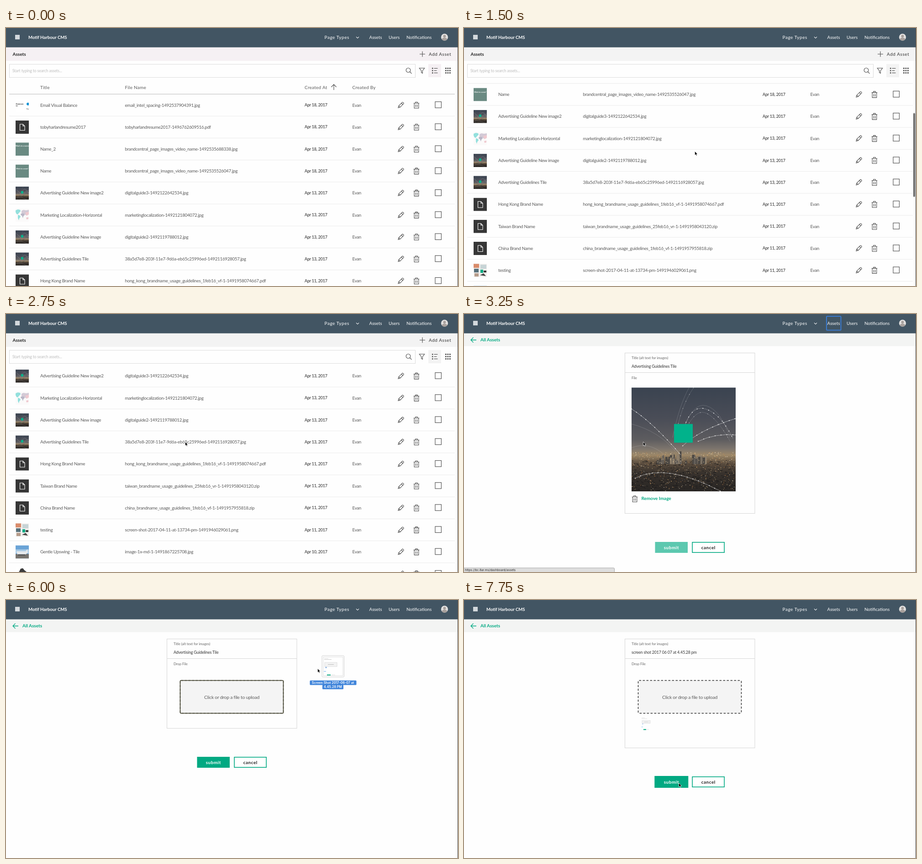
Animation of 990 by 566 pixels, one loop 8 s. Source, as an HTML page:

```html
<!DOCTYPE html>
<html lang="en">
<head>
<meta charset="utf-8">
<title>Asset manager</title>
<style>
html, body { margin: 0; width: 100%; height: 100%; overflow: hidden; background: #fefefe; }
svg { display: block; }
text { font: 9.8px Lato, sans-serif; letter-spacing: -.3px; fill: #5a5a5a; white-space: pre; }
text.head { font-size: 10px; letter-spacing: .25px; }
text.date { font-size: 9px; font-weight: 500; letter-spacing: -.2px; fill: #333; }
text.nav { fill: #fff; letter-spacing: 0; font-size: 9.8px; }
text.wide { letter-spacing: .55px; font-size: 10px; }
text.bold { font-weight: 700; letter-spacing: 0; font-size: 10px; fill: #222; }
text.label { font-size: 7.8px; letter-spacing: -.08px; fill: #666; }
text.value { font-size: 8.9px; letter-spacing: -.18px; fill: #333; }
text.btn { font-weight: 700; font-size: 10px; letter-spacing: .5px; fill: #222; }
text.tiny { font-weight: 700; font-size: 4.2px; letter-spacing: -.1px; fill: #fff; }
text.sys { font: 600 7.1px Inter, sans-serif; letter-spacing: 0; fill: #fff; }
.green { fill: #01a982 !important; }
.line { fill: none; stroke: #4a4a4a; stroke-width: 1.1; }
.border { fill: none; stroke: #d6d6d6; }
</style>
</head>
<body>
<script>
const LOOP = 8000, ROW = 48.22, TOP = 169;

let seed = 7;
const rnd = () => (seed = seed * 16807 % 2147483647) / 2147483647;
const rect = (x, y, w, h, fill, more = '') =>
  `<rect x="${x}" y="${y}" width="${w}" height="${h}" fill="${fill}" ${more}/>`;
const text = (x, y, s, cls = '', more = '') => `<text x="${x}" y="${y}" class="${cls}" ${more}>${s}</text>`;
const path = (d, more = 'class="line"') => `<path d="${d}" ${more}/>`;
const group = (id, s, more = '') => `<g id="${id}" ${more}>${s}</g>`;
const use = (id, x, y, more = '') => `<use href="#${id}" x="${x}" y="${y}" ${more}/>`;
const mid = 'text-anchor="middle"';

// Night city panorama, 228 x 228
function city() {
  let s = rect(0, 0, 228, 228, 'url(#dusk)');
  const lights = [['#141416', 420, 5], ['#d98f4a', 190, 1.3], ['#f3d49a', 230, 1.4], ['#fff3dc', 110, 1.4]];
  for (const [color, n, size] of lights) {
    let d = '';
    for (let i = 0; i < n; i++) {
      const w = (.5 + rnd() * size).toFixed(1);
      const y = color == '#141416' ? 160 + 66 * rnd() : 142 + 84 * rnd() ** 1.4;
      d += `M${(rnd() * 226).toFixed(1)} ${y.toFixed(1)}h${w}v1.1h-${w}z`;
    }
    s += path(d, `fill="${color}" opacity=".7"`);
  }
  for (let i = 0; i < 44; i++) {
    const x = 52 + rnd() * 112, h = 6 + rnd() * (26 - Math.abs(x - 108) * .3), w = 3 + rnd() * 3;
    s += rect(x.toFixed(1), (168 - h).toFixed(1), w.toFixed(1), h.toFixed(1), ['#4b4743', '#655f59', '#8f806c'][rnd() * 3 | 0]) +
      rect((x + 1).toFixed(1), (169 - h + rnd() * h * .7).toFixed(1), 1, 1.5, '#ffe6b5');
  }
  const arcs = ['M0 47Q46 76 108 148', 'M111 101Q128 36 162 47T222 112', 'M8 199Q75 164 196 228', 'M112 128Q150 92 228 68', 'M146 118Q184 100 228 104'];
  const faint = ['M96 112Q106 44 136 0', 'M90 110Q104 40 126 0', 'M108 108Q132 30 164 40T216 112', 'M111 108Q136 48 160 55T216 118', 'M0 132Q38 118 70 146', 'M0 80Q60 96 96 140'];
  arcs.forEach((d, i) => s += path(d, `fill="none" stroke="#fff" stroke-width="${i == 1 ? .5 : 1}" opacity=".5"`) +
    path(d, 'fill="none" stroke="#fff" stroke-width="2" stroke-linecap="round" stroke-dasharray="0 13" opacity=".9"'));
  faint.forEach((d, i) => s += path(d, 'fill="none" stroke="#fff" stroke-width=".6" opacity=".28"') +
    (i % 3 ? '' : path(d, 'fill="none" stroke="#fff" stroke-width="1.5" stroke-linecap="round" stroke-dasharray="0 17" opacity=".6"')));
  return s + rect(93, 80, 41, 41, '#01b28b');
}

// Thumbnails, 29 x 29
const thumbs = {
  mail: rect(0, 0, 29, 29, '#fff') + text(.5, 13.5, 'Dunmore', 'tiny', 'style="fill:#222"') +
    text(.5, 17, 'ist', 'tiny', 'style="fill:#333"') + '<circle cx="27" cy="12" r="3" fill="#1593d4"/>' +
    text(23.5, 24, 'The', 'tiny', 'style="fill:#666;font-size:3.5px"'),
  doc: rect(0, 0, 29, 29, '#363636') + path('M9.5 8h6.5l4 4v9.5H9.5zM16 8v4h4', 'fill="none" stroke="#fff" stroke-width="1.1"'),
  name: rect(0, 0, 29, 29, '#6a8a82') + text(14.5, 9.2, "What's in a name?", 'tiny', mid),
  name2: rect(0, 0, 29, 29, '#6a8a82') + text(14.5, 10.5, "What's in a name?", 'tiny', mid + ' style="font-size:3.5px"'),
  city: '<g transform="scale(.1272)"><use href="#photo"/></g>',
  map: rect(0, 0, 29, 29, '#fbfafa') + path('M0 4l5-2 5 1 1 3-4 4-2 3-3-1-2-4zM5 14l4 1 2 3-3 4-1 4-2-5z', 'fill="#93e0dd"') +
    path('M13 5l4-2 6 1 6-1v8l-4 1-2 3-3-2-4 1-3-4z', 'fill="#d3cad6"') + path('M12 11l6 0 2 3-3 3-1 4-2-5-3-2z', 'fill="#b9b6c6"') +
    path('M21 9l8-2v6l-5 3zM23 20l5-1v4l-4 1z', 'fill="#efc9cf"'),
  collage: rect(0, 0, 29, 29, '#f2efed') + rect(0, 0, 12, 9, '#d98c6b') + rect(1, 11, 10, 8, '#57707a') + rect(15, 2, 13, 9, '#c7d4d6') +
    rect(15, 13, 6, 7, '#01a982') + rect(22, 15, 6, 4, '#333') + rect(2, 21, 9, 7, '#b69b8a') + path('M14 25l8-4 5 6z', 'fill="#444"'),
  plane: rect(0, 0, 29, 29, '#6aa3d6') + rect(0, 9, 29, 9, '#a9cbe6') + rect(0, 19, 29, 10, '#77736e') +
    path('M2 13h20l4-5 1 8-5 4H4z', 'fill="#e6e9ec"') + rect(5, 20, 16, 2, '#45484c'),
  dark: rect(0, 0, 29, 29, '#fff') + path('M4 15l4-6 3-6 5-1 3 4 5 4 1 7z', 'fill="#3c3c3c"')
};

const rows = [
  ['mail', 'Email Visual Balance', 'email_intel_spacing-1492537904391.jpg', 18],
  ['doc', 'tobyharlandresume2017', 'tobyharlandresume2017-1496762609516.pdf', 18],
  ['name', 'Name_2', 'brandcentral_page_images_video_name-1492535688338.jpg', 18],
  ['name2', 'Name', 'brandcentral_page_images_video_name-1492535526047.jpg', 18],
  ['city', 'Advertising Guideline New image2', 'digitalguide3-1492122642534.jpg', 13],
  ['map', 'Marketing Localization-Horizontal', 'marketinglocalization-1492121804072.jpg', 13],
  ['city', 'Advertising Guideline New image', 'digitalguide2-1492119788012.jpg', 13],
  ['city', 'Advertising Guidelines Tile', '38a5d7e8-203f-11e7-9d6a-eb65c25996ed-1492116928057.jpg', 13],
  ['doc', 'Hong Kong Brand Name', 'hong_kong_brandname_usage_guidelines_1feb16_vf-1-1491958074667.pdf', 11],
  ['doc', 'Taiwan Brand Name', 'taiwan_brandname_usage_guidelines_25feb16_vr-1-1491958043120.zip', 11],
  ['doc', 'China Brand Name', 'china_brandname_usage_guidelines_1feb16_vf-1-1491957955818.zip', 11],
  ['collage', 'testing', 'screen-shot-2017-04-11-at-13734-pm-1491946029061.png', 11],
  ['plane', 'Gentle Upswing - Tile', 'image-1x-md-1-1491867225708.jpg', 10],
  ['dark', '', '', 10]
];

const row = ([thumb, title, file, day], i) => {
  const y = TOP + i * ROW, b = y + 3.6;
  return `<svg x="21" y="${y - 14.2}" width="29" height="29"><use href="#${thumb}"/></svg>` +
    text(75, b, title) + text(260.5, b, file) + text(654, b - .4, `Apr ${day}, 2017`, 'date') + text(758.5, b, 'Evan') +
    use('pencil', 865, y) + use('bin', 899, y) + rect(940, y - 7.3, 13.4, 13.4, 'none', 'class="line"') +
    rect(7, y + 23.7, 976, 1, '#ebebeb');
};

const listPage =
  rect(0, 42, 989, 30, '#f4f4f4', 'class="tint"') + text(14.5, 60.8, 'Assets', 'bold') +
  path('M906 57.3h12M912 51.3v12') + text(926, 61, 'Add Asset', 'wide', 'style="fill:#333"') +
  `<svg y="115" width="990" height="451" viewBox="0 115 990 451">${group('scroll',
    text(75, 134, 'Title', 'head') + text(260.5, 134, 'File Name', 'head') + text(654, 134, 'Created At', 'head') +
    text(758.5, 134, 'Created By', 'head') + path('M718 136v-12M712.5 129.5l5.5-5.6 5.5 5.6') +
    rect(7, 144.3, 976, 1.5, '#cfcfcf') + rows.map(row).join(''))}</svg>` +
  rect(7.5, 79.5, 889, 29, '#fefefe', 'style="stroke:#dcdcdc"') +
  text(14, 97, 'Start typing to search assets...', '', 'style="fill:#bcbcbc;font-size:8.6px;letter-spacing:-.1px"') +
  '<circle cx="881" cy="92.5" r="4.8" class="line"/>' + path('M884.5 96l4 4.2') +
  path('M905.3 88h11.4l-4.4 5.6v5.6l-2.6-1.6v-4z') +
  rect(925, 79, 28, 29, '#f1f1f1', 'class="tint"') +
  [88.5, 93.5, 98.5].map((y, i) => rect(933, y - 1.2, 2.4, 2.4, '#444') + path(`M937.5 ${y}h${i == 1 ? 6 : 8}`) +
    [963.5, 968, 972.5].map(x => rect(x - 1.4, y - 1.4, 2.7, 2.7, '#444')).join('')).join('') +
  rect(984, 117, 4, 184, '#6c6c6c', 'rx="2" id="thumb"');

const sheet = rect(0, 0, 43, 41, '#fff', 'stroke="#cfcfcf" stroke-width=".7"') + rect(2, 3, 9, 1, '#ddd') + rect(2, 5, 16, 1, '#ccc') +
  rect(3, 12, 27, 9, '#f3f3f3', 'stroke="#ccc" stroke-width=".6"') + rect(10, 16, 13, 1, '#bbb') +
  '<circle cx="6" cy="23" r="1.6" fill="#7fa9dd"/>' + rect(1, 31, 5, 1, '#6fb0f0') + rect(8, 38.5, 8, 2, '#01a982') + rect(18, 38.5, 8, 2, '#eee');

const editPage =
  rect(0, 42, 989, 28.5, '#f3f4f3') + path('M27 57H15.5M20.5 51.5L15 57l5.5 5.5', 'fill="none" stroke="#01a982" stroke-width="1.3"') +
  text(36, 59.9, 'All Assets', 'bold green') +
  rect(352.5, 85.5, 284.5, 352, 'none', 'class="border" id="form"') + path('M352.5 128.5H637', 'class="border"') +
  text(367, 99.4, 'Title (alt text for images)', 'label') +
  group('oldTitle', text(367, 118, 'Advertising Guidelines Tile', 'value')) +
  group('newTitle', text(367, 118, 'screen shot 2017 06 07 at 4.45.28 pm', 'value')) +
  group('image', text(367, 142.8, 'File', 'label') + use('photo', 367, 161.3) +
    use('bin', 374, 405.3) + text(388.5, 408, 'Remove Image', 'bold green')) +
  group('upload', text(367, 142.8, 'Drop File', 'label') + rect(381.5, 176.5, 226, 72, '#f4f4f4', 'rx="2"') +
    rect(381.5, 176.5, 226, 72, 'none', 'rx="2" stroke="#333" stroke-width="1.5" stroke-dasharray="4.6 3.4" id="dashes"') +
    rect(381.5, 176.5, 226, 72, 'none', 'rx="2" stroke="#3b3b24" stroke-width="1.5" id="solid"') +
    text(494.5, 216.7, 'Click or drop a file to upload', '', mid + ' style="font-size:10.4px;letter-spacing:-.25px"')) +
  group('preview', rect(389, 258, 7, .8, '#ddd') + rect(389, 260, 12, .8, '#ddd') + rect(390, 264.5, 18, 6, '#f2f2f2', 'stroke="#d5d5d5" stroke-width=".6"') +
    rect(394.5, 267.2, 9, .8, '#ccc') + '<circle cx="391.5" cy="272" r="1" fill="#8fb6e6"/>' + rect(388.5, 278, 3.5, .8, '#7cc0ee') +
    rect(393, 283.2, 6, 2, '#01a982') + rect(400.5, 283.5, 4, 1.2, '#e3e3e3')) +
  group('buttons', rect(418.5, 500, 71.5, 24, '#01a982', 'id="submit"') + rect(417.3, 499, 74, 26, '#01a982', 'id="hover"') +
    text(454.4, 515.5, 'submit', 'btn', mid + ' style="fill:#fff"') +
    rect(500.1, 500.8, 70, 22.4, '#fff', 'stroke="#01a982" stroke-width="1.6"') + text(535.2, 515.5, 'cancel', 'btn', mid));

const fileIcon = rect(10, -28, 48.5, 47, '#fff', 'rx="2" stroke="#d2d2d2"') + `<g transform="translate(13 -25)">${sheet}</g>` +
  rect(-16.5, 26.5, 102, 10, '#3f84da', 'rx="1.5"') + rect(11, 36, 46, 9.7, '#3f84da', 'rx="1.5"') +
  text(34, 34, 'Screen Shot 2017-06-07 at', 'sys', mid) + text(34, 43.3, '4.45.28 PM', 'sys', mid);

const header = rect(0, 0, 990, 42.4, '#425563') + rect(20, 15, 10, 10, '#d3d8dc') +
  text(49, 23.8, 'Motif Harbour CMS', 'bold', 'style="fill:#fff;font-size:9.6px"') +
  text(697.5, 24, 'Page Types', 'nav wide') + path('M767 19.3l3 3 3-3', 'fill="none" stroke="#fff" stroke-width="1.1"') +
  text(795.5, 24, 'Assets', 'nav') + text(838, 24, 'Users', 'nav') + text(877, 24, 'Notifications', 'nav') +
  '<circle cx="960.5" cy="20.2" r="7.6" fill="#e2e0df"/><circle cx="960.5" cy="18" r="3" fill="#a79f9b"/>' +
  path('M954.6 25a6 4.5 0 0 1 11.8 0a7.6 7.6 0 0 1-11.8 0z', 'fill="#a79f9b"') +
  rect(794, 5, 31.5, 30.5, 'none', 'rx="1.5" stroke="#3a7bd0" stroke-width="2" id="ring"');

const status = rect(-1, 557, 330.5, 12, '#dedede', 'rx="2" stroke="#a8a8a8"') +
  text(2, 564.2, 'https://bc.8ar.ms/dashboard/assets', 'sys', 'style="fill:#222;font-weight:400;font-size:6.6px"');

document.body.innerHTML = `<svg width="990" height="566" viewBox="0 0 990 566"><defs>
  <linearGradient id="dusk" x2="0" y2="1">${[[0, '#3a4350'], [.3, '#4a4d57'], [.5, '#5d5c5f'], [.59, '#7d756d'], [.65, '#9c8768'], [.73, '#5a4c3e'], [.82, '#38322d'], [1, '#282523']]
    .map(([o, c]) => `<stop offset="${o}" stop-color="${c}"/>`).join('')}</linearGradient>
  <clipPath id="frame">${rect(0, 0, 228, 228, '#000')}</clipPath>
  ${group('photo', city(), 'clip-path="url(#frame)"')}
  ${Object.entries(thumbs).map(([id, s]) => group(id, s)).join('')}
  ${group('pencil', path('M-6 6l1.2-4.2L2.8-5.8q.9-.8 1.8 0l1.2 1.2q.8.9 0 1.8L-1.8 4.8zM1-4l3 3M-4.8 1.8l3 3'))}
  ${group('bin', path('M-6.2-4h12.4M-2.2-4v-2.5h4.4V-4M-4.8-4v11h9.6v-11M-1.6-1v5.5M1.6-1v5.5'))}
  </defs>${rect(0, 0, 990, 566, '#fefefe')}
  ${group('list', listPage)}${group('edit', editPage)}${header}${group('status', status)}
  ${rect(989, 0, 1, 566, '#4a4a4a')}
  ${group('file', fileIcon)}
  ${group('cursor', path('M.5.5v8.6l2-1.8 1.3 3 1.5-.7-1.3-2.9h2.7z', 'fill="#000" stroke="#fff" stroke-width=".7"'))}</svg>`;

// Each step [time, value] holds until the next one.
const play = (el, prop, steps) => {
  const frames = steps.map(([t, v]) => ({ offset: t / LOOP, [prop]: v, easing: 'steps(1, end)' }));
  frames.push({ offset: 1, [prop]: steps.at(-1)[1] });
  el.animate(frames, { duration: LOOP, iterations: Infinity });
};
const $ = id => document.getElementById(id);
const show = (id, from, to = LOOP) => {
  const steps = from ? [[0, 0], [from, 1]] : [[0, 1]];
  if (to < LOOP) steps.push([to, 0]);
  play($(id), 'opacity', steps);
};
const move = (id, steps) => play($(id), 'transform', steps.map(([t, x, y]) => [t, `translate(${x}px, ${y}px)`]));

const OPEN = 3250, REMOVE = 4500, GRAB = 6000, DROP = 6750;
show('list', 0, OPEN);
show('edit', OPEN);
show('ring', OPEN, REMOVE);
show('status', OPEN, 5000);
show('image', 0, REMOVE);
show('upload', REMOVE);
show('solid', GRAB, DROP);
show('file', GRAB, DROP);
show('oldTitle', 0, DROP);
show('newTitle', DROP);
show('preview', DROP);
show('hover', 7250);
show('cursor', 500);
show('thumb', 1000, 2750);
play($('submit'), 'opacity', [[0, .64], [3500, 1]]);
play($('form'), 'height', [[0, '352px'], [REMOVE, '196px'], [DROP, '239px']]);
move('buttons', [[0, 0, 0], [REMOVE, 0, -156], [DROP, 0, -113]]);
document.querySelectorAll('.tint').forEach(el => play(el, 'fill', [[0, '#f5f0f3'], [1000, '#f3f3f3']]));

const scroll = [[0, 0], [1000, 57], [1250, 118], [1500, 168], [1750, 205], [2000, 226]];
move('scroll', scroll.map(([t, y]) => [t, 0, -y]));
move('thumb', scroll.map(([t, y]) => [t, 0, y * .414]));

const drag = [[GRAB, 682, 150], [6250, 600, 178], [6500, 472, 205]];
move('file', [[0, 682, 150], ...drag]);
move('cursor', [[0, 505, 270], [2250, 421, 286], [2500, 402, 282], [2750, 392, 280], [3500, 395, 310], [3750, 408, 370],
  [4000, 417, 406], [4250, 417, 410], [5000, 620, 330], [5250, 850, 230], ...drag, [7000, 472, 310], [7250, 471, 392], [7500, 470, 401]]);
</script>
</body>
</html>
```
